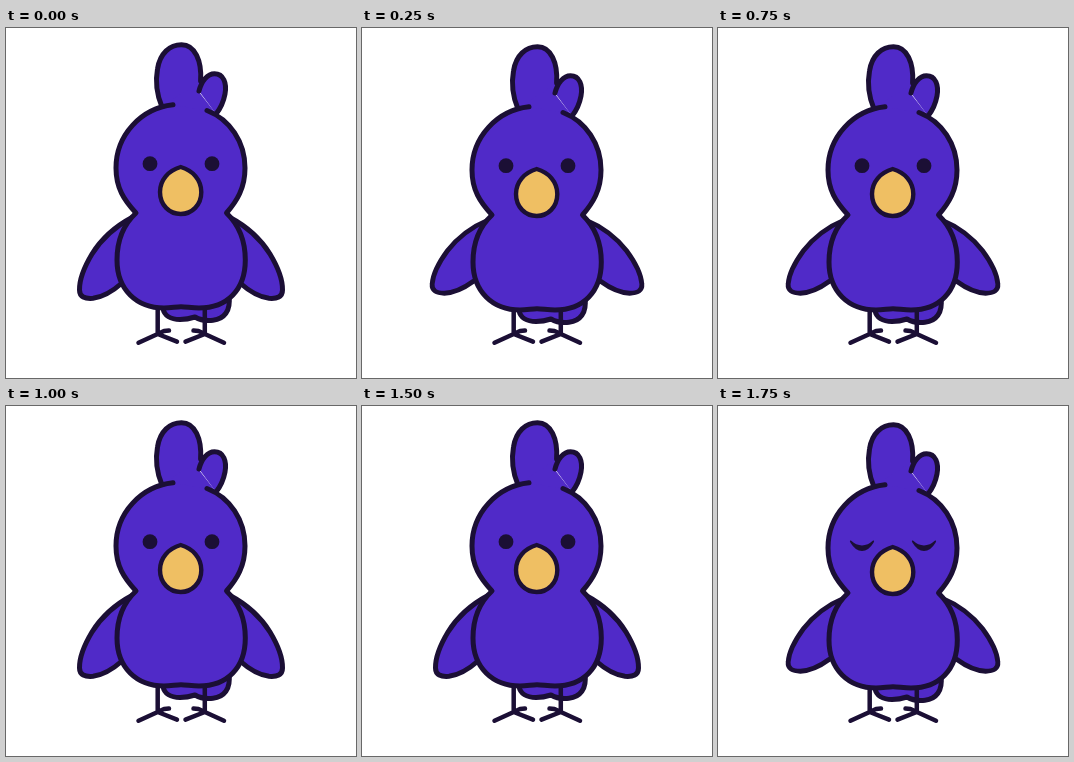
Animation of 350x350 px, one loop 2000 ms. Source, as an HTML page:

```html
<!DOCTYPE html>
<html lang="en">
<head>
<meta charset="utf-8">
<title>Bird</title>
<style>
  html, body { margin: 0; width: 100%; height: 100%; overflow: hidden; background: #fff; }
  svg { display: block; width: 100vw; height: 100vh; }
  .line { fill: none; stroke: #1b0f35; stroke-width: 5; stroke-linecap: round; stroke-linejoin: round; }
  .skin { fill: #502ac8; }
  .ink { fill: #1b0f35; }
  .beak { fill: #efbf63; stroke-width: 4.4; }
  .foot { stroke-width: 4.5; }
</style>
</head>
<body>
<svg viewBox="0 0 350 350">
  <defs>
    <path id="wing" class="line skin" d="M126 189.5 C110 198 96 210 86 226 C77 241 73.3 253 73.5 262 C73.5 269 79 271 87 270.3 C97 269 107 263 116 255"/>
    <path id="foot" class="line foot" d="M151.7 270 V306 M132.5 314.7 L151.7 306 L171 313.7 M151.7 306 L158 303 L163 302.6"/>
    <path id="lid" class="ink" d="M132.6 132.2 Q144 142.6 155.4 132.2 Q156.8 133 155.5 134.8 Q150.5 143.1 144 143.1 Q137.5 143.1 132.5 134.8 Q131.2 133 132.6 132.2 Z"/>
  </defs>

  <g class="bob">
    <path class="line skin" d="M157 280 C158 288 165 291.5 174 291.5 C181 291.5 185 290.3 189 289 C194 292 200 293 207 292.3 C218 291 225 283 223 268"/>
  </g>

  <use href="#foot"/>
  <use href="#foot" transform="translate(350.5 0) scale(-1 1)"/>

  <g class="wing"><use href="#wing"/></g>
  <g transform="translate(350 0) scale(-1 1)"><g class="wing"><use href="#wing"/></g></g>

  <g class="bob">
    <path class="skin" d="M156 79 L175 40 L195 52 L193 64 L211 87 L160 85 Z"/>
    <path class="line skin" d="M156 79 C150.5 66 149.5 52 151.5 41 C154 25 164 16.7 175.5 16.7 C189 16.7 196 33 194.6 53"/>
    <path class="line skin" d="M193 63 C195.5 53 201.5 45.7 208.5 45.7 C217.5 45.7 221 55 219 66 C217.5 74 214 81 210 86"/>
    <path class="line skin" d="M167 76.8 C135 80.3 110 107 110 140 C110 160 118 172 130 185 C116 198 111 214 111 232 C111 262 131 280 158 280 C165 280 170 278.8 175 278.8 C180 278.8 186 280 193 280 C221 280 239.3 262 239.3 232 C239.3 214 234 198 220.5 185 C231 173 239 160 239 140 C239 114 224 91.5 201 82.5"/>
    <path class="line beak" d="M174.7 139 C187 142.5 195.3 152 195.3 164 C195.3 177 186 186 174.7 186 C163.3 186 154 177 154 164 C154 152 162.3 142.5 174.7 139 Z"/>
    <g id="open" class="ink">
      <circle cx="144" cy="135.7" r="7.4"/>
      <circle cx="206" cy="135.7" r="7.4"/>
    </g>
    <g id="shut">
      <use href="#lid"/>
      <use href="#lid" x="62"/>
    </g>
  </g>
</svg>
<script>
  const STEP = 250, COUNT = 8, BLINK = 7;
  const BOB = 'translate(0 2)';
  const FLAP = 'translate(126 192) rotate(5.5) scale(.96) translate(-125 -190)';
  const bobs = document.querySelectorAll('.bob');
  const wings = document.querySelectorAll('.wing');
  const open = document.getElementById('open');
  const shut = document.getElementById('shut');

  function pose(step) {
    const low = step % 2 === 1;
    const blink = step === BLINK;
    bobs.forEach(el => el.setAttribute('transform', low ? BOB : ''));
    wings.forEach(el => el.setAttribute('transform', low ? FLAP : ''));
    open.setAttribute('visibility', blink ? 'hidden' : 'visible');
    shut.setAttribute('visibility', blink ? 'visible' : 'hidden');
  }

  const start = performance.now();
  function tick() {
    pose(Math.floor((performance.now() - start) / STEP) % COUNT);
    requestAnimationFrame(tick);
  }
  tick();
</script>
</body>
</html>
```
